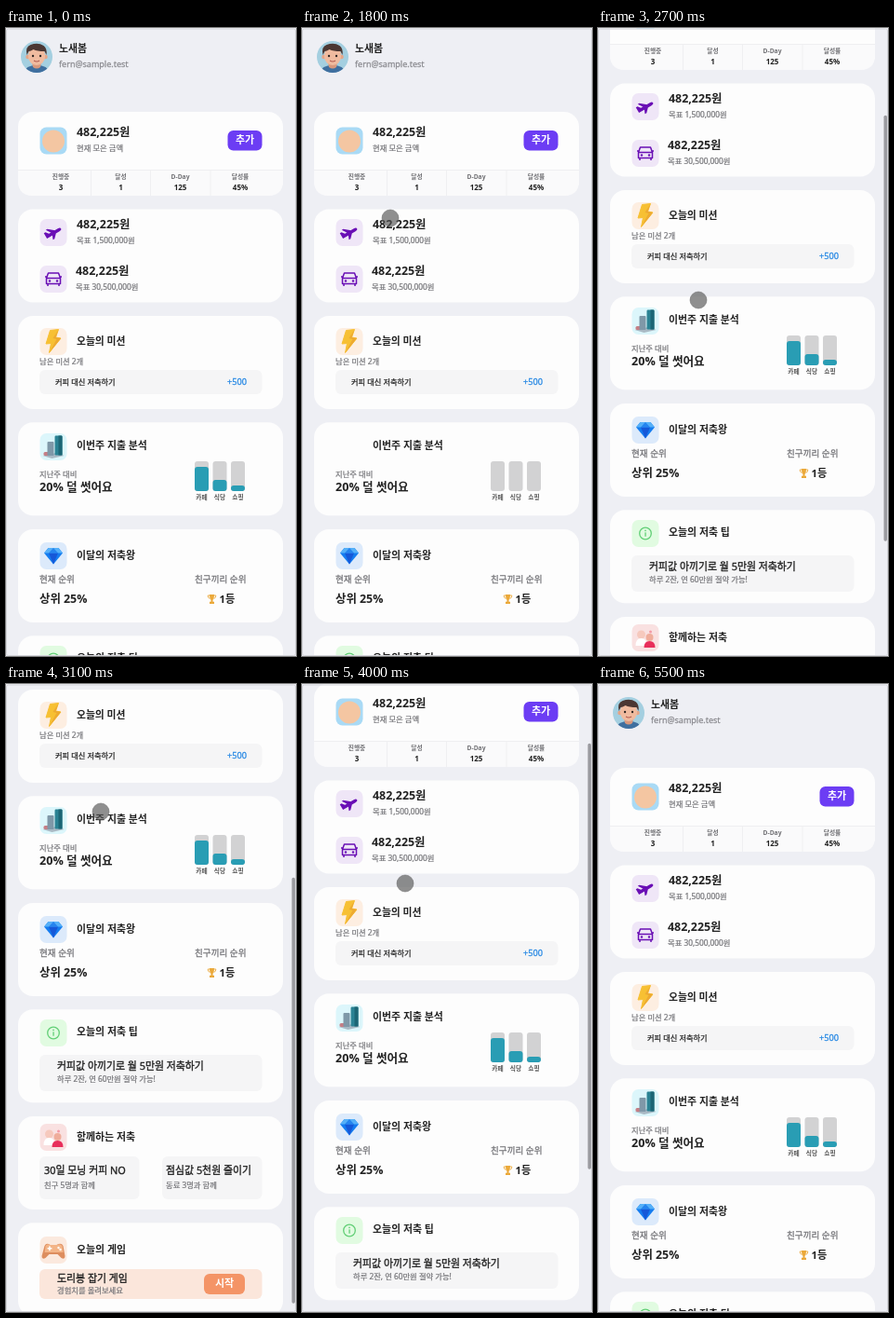
An HTML page for the animation above (5.6 s loop, 312 px wide and 674 px high).

```html
<!DOCTYPE html>
<html lang="ko">
<meta charset="utf-8">
<style>
html, body { margin: 0; height: 100%; overflow: hidden; background: #eeeff4 }
svg { display: block; width: 312px; height: 674px; font-family: 'Noto Sans', 'Noto Sans CJK KR', 'Noto Sans CJK', sans-serif }
</style>
<svg id="stage" viewBox="0 0 312 674"></svg>
<script>
const LOOP = 5600, STEP = 100;
const INK = '#222', GREY = '#77777b';

const rect = (x, y, w, h, r, fill, extra = '') =>
  `<rect x="${x}" y="${y}" width="${w}" height="${h}" rx="${r}" fill="${fill}" ${extra}/>`;
const circle = (x, y, r, fill) => `<circle cx="${x}" cy="${y}" r="${r}" fill="${fill}"/>`;
const path = (d, fill, extra = '') => `<path d="${d}" fill="${fill}" ${extra}/>`;
// y is the middle of the line; regular text gets a thin stroke for a medium weight
const text = (x, y, size, str, fill = INK, weight = 400, anchor = 'start') =>
  `<text x="${x}" y="${y + size * .36}" font-size="${size}" fill="${fill}" font-weight="${weight}" text-anchor="${anchor}"
    stroke="${fill}" stroke-width="${weight < 600 ? size * .03 : 0}">${str}</text>`;
const bold = (x, y, size, str, fill = INK, anchor) => text(x, y, size, str, fill, 600, anchor);
const note = (x, y, str) => text(x, y, 8.3, str, GREY);
const card = (y, h = 100) => rect(13, y, 285, h, 16, '#fdfdfd');
const panel = (x, y, w, h, fill = '#f5f5f6') => rect(x, y, w, h, 6, fill);
const icon = (y, fill, art, id = '') =>
  `<g id="${id}" transform="translate(36.5 ${y})">${rect(0, 0, 29, 29, 7, fill)}${art}</g>`;

const avatar = `<clipPath id="face"><circle cx="33" cy="31" r="17"/></clipPath><g clip-path="url(#face)">
  ${rect(16, 14, 34, 34, 0, '#a4cfe0')}
  ${path('M19 49q1-9 14-9t14 9z', '#3f6f9f')}${path('M28 37h10l-1 5q-4 3-8 0z', '#d9987c')}
  ${circle(23.5, 31, 2.3, '#e5a587')}${circle(42.5, 31, 2.3, '#e5a587')}
  ${rect(24, 20, 18, 20, 9, '#f0bb9f')}
  ${path('M22.500 29q-2-9 4-11 8-3 14 1 4 3 3 10l-2-4q-8 0-12-2-3 2-5 2z', '#4b3733')}
  ${circle(29, 30, 1.2, '#332925')}${circle(37, 30, 1.2, '#332925')}
  ${path('M30 35q3 2 6 0', 'none', 'stroke="#b55b50" stroke-width="1.2"')}</g>`;

// Both marks are drawn along a level body, the plane is then tilted
const plane = `<g transform="translate(14.500 15) rotate(-30)" fill="#6a0fb5">
  <path d="M-9-5l2 0 2.500 3.200h11q3 0 3 1.800t-3 1.800h-15.500zM-2-1.500L-5.500-7h2L3-1.500zM-2 1h5l-5 5h-2z"/></g>`;
const car = `<g fill="none" stroke="#6a0fb5" stroke-width="1.500" stroke-linejoin="round">
  <path d="M7 13.500l2-5.500h11l2 5.500v6H7zM7 13.500h15M5.500 12h2m14 0h2M8.500 19.500v2.500m12-2.500v2.500"/></g>
  ${circle(10.500, 16.500, 1.2, '#6a0fb5')}${circle(18.500, 16.500, 1.2, '#6a0fb5')}`;
const bolt = path('M11 2.500L20 1.500l-3 8.500 5.500 1L10 26.500l2-10-5.500.5z', '#f7c033', 'stroke="#f7c033" stroke-linejoin="round"') +
  path('M20 1.500l-3 8.500 5.500 1L10 26.500 18 12l-4-1z', '#eda932');
const chart = path('M3 24l15-3 8 3-13 3z', '#a9b9c4') + rect(4, 20, 9, 4, 1.500, '#c57f86') +
  rect(8, 9, 7, 15, 1, '#7f98a8') + rect(16, 2.500, 8, 21, 1.200, '#2b8394') + path('M20 2.500h3q1 0 1 1v20h-4z', '#1c6675');
const gem = path('M4.500 11.500l4.500-5.500h11l4.500 5.500-10 12z', '#147cf0') + path('M4.500 11.500l4.500-5.500h11l4.500 5.500z', '#55b0f8') +
  path('M9.500 11.500h10l-5 12z', '#1658d8') + path('M9.500 11.500l5-5.500 5 5.500z', '#2584ef');
const info = `<circle cx="14.500" cy="14.500" r="6.300" fill="none" stroke="#62cf76" stroke-width="1.300"/>` +
  rect(13.900, 13.300, 1.300, 4.500, .5, '#62cf76') + circle(14.500, 11.400, .8, '#62cf76');
const people = circle(10, 11, 4.500, '#f6c9bd') + path('M4 23q0-8 6-8t6 8z', '#fff') +
  circle(19, 14, 4, '#efad9b') + path('M13 25q0-7 6-7t6 7z', '#e82f5b') + circle(20, 8, 1.500, '#f49aa5');
const pad = path('M5 10q2-4 6-1h7q5-3 7 1l2 11q0 4-4 2l-4-4h-9l-4 4q-4 2-4-2z', '#dd8d5e') +
  path('M6 10q2-3 5-1h7q4-2 6 1l1 7H5z', '#f3b487') + rect(8, 12, 5, 1.500, .5, '#fff') +
  rect(9.700, 10.300, 1.500, 5, .5, '#fff') + circle(20, 12, 1.200, '#fff') + circle(22, 14, 1.200, '#fff');
const trophy = path('M219 608h5q0 5-1.500 5.800v2h1.500v2.200h-5v-2.200h1.500v-2q-1.500-.8-1.500-5.800z', '#eba93a') +
  path('M219 609h-1.800q0 3 2 3.300m4.800-3.300h1.800q0 3-2 3.300', 'none', 'stroke="#eba93a" stroke-width=".9"');

const stats = [['진행중', '3'], ['달성', '1'], ['D-Day', '125'], ['달성률', '45%']].map(([label, value], i) => {
  const x = [59, 123.500, 187.500, 252][i];
  return bold(x, 160, 6.700, label, '#707074', 'middle') + bold(x, 171, 8, value, INK, 'middle') +
    (i ? rect(x - 32.500, 153, 1, 27, 0, '#efeff1') : '');
}).join('');

const levels = [26, 12, 6];
const bars = ['카페', '식당', '쇼핑'].map((label, i) => {
  const x = 203 + i * 19.500;
  return rect(x, 465, 15, 32, 3, '#d2d2d3') + rect(x, 497, 15, 0, 3, '#299db4', 'class="bar"') +
    bold(x + 7.500, 504, 6.700, label, '#555', 'middle');
}).join('');

const page = [
  avatar, bold(57, 22, 10.900, '노새봄'), text(57, 39, 9, 'fern@sample.test', '#8c8c91'),

  card(90, 90), path('M13 153h285v11q0 16-16 16H29q-16 0-16-16z', '#fafafb'), rect(13, 152, 285, 1, 0, '#efeff1'),
  icon(106.500, '#a9daf5', circle(14.500, 15, 12, '#f4c6a2')),
  bold(76, 112, 12.400, '482,225원'), note(76, 129, '현재 모은 금액'),
  rect(238.500, 110, 37, 21.500, 6, '#6c3df4'), bold(257, 120.500, 11, '추가', '#fff', 'middle'), stats,

  card(194.500), icon(205, '#efe6f7', plane), bold(76, 211, 12.400, '482,225원'), note(76, 228, '목표 1,500,000원'),
  icon(255, '#efe6f7', car), bold(75, 261, 12.400, '482,225원'), note(75, 278, '목표 30,500,000원'),

  card(309), icon(322, '#fdeee1', bolt), bold(76, 336, 10.800, '오늘의 미션'), note(36, 358, '남은 미션 2개'),
  panel(36, 367, 239.500, 26), text(53, 380, 8.200, '커피 대신 저축하기'),
  text(259, 380, 9.200, '+500', '#2688e4', 400, 'end'),

  card(423.300), icon(435, '#dcf6fb', chart, 'chart'), bold(76, 448, 10.900, '이번주 지출 분석'),
  note(36, 479, '지난주 대비'), bold(36, 492, 12.600, '20% 덜 썻어요'), bars,

  card(538), icon(552, '#dceafb', gem), bold(76, 566, 10.900, '이달의 저축왕'),
  text(36, 592, 9.600, '현재 순위', GREY), bold(36, 613, 12.400, '상위 25%'),
  text(203, 592, 9.600, '친구끼리 순위', GREY), trophy, bold(229.500, 613, 11.200, '1등'),

  card(652.300), icon(663, '#e1fbe1', info), bold(76, 676, 10.900, '오늘의 저축 팁'), panel(36, 701, 239.500, 39),
  text(55, 713, 10.900, '커피값 아끼기로 월 5만원 저축하기'), note(55, 727, '하루 2잔, 연 60만원 절약 가능!'),

  card(767), icon(775, '#f9e1e1', people), bold(76, 789, 10.900, '함께하는 저축'),
  panel(36, 810, 107.500, 46), text(41, 825, 10.900, '30일 모닝 커피 NO'), note(41, 841, '친구 5명과 함께'),
  panel(168, 810, 107.500, 46), text(172, 825, 10.900, '점심값 5천원 줄이기'), note(172, 841, '동료 3명과 함께'),

  card(881.300), icon(896, '#fbe9de', pad), bold(76, 910, 10.900, '오늘의 게임'), panel(36, 931, 239.500, 32, '#fbe6db'),
  text(55, 941, 10.900, '도리봉 잡기 게임'), note(55, 954, '경험치를 올려보세요'),
  rect(213, 936, 44, 22, 6, '#f49466'), bold(235, 946.500, 11, '시작', '#fff', 'middle')
].join('');

const $ = id => document.getElementById(id);
$('stage').innerHTML = rect(0, 0, 312, 674, 0, '#eeeff4') + `<g id="page">${page}</g>` +
  rect(307.500, 2, 3.500, 457, 1.700, '#9b9ba0', 'id="thumb"') +
  '<circle id="touch" r="9" fill="#555" fill-opacity=".65" stroke="#666" stroke-opacity=".5"/>' +
  rect(.5, 1, 311, 672.500, 2, 'none', 'stroke="#d5d6db"');
const barNodes = document.querySelectorAll('.bar');

// Each key is [time, ...values]
const scrollKeys = [[2400, 0], [2500, 25], [2600, 78], [2700, 135], [2800, 190], [2900, 240], [3000, 280], [3100, 303],
  [3200, 314], [3300, 318], [3700, 318], [3800, 290], [3900, 190], [4000, 91], [4100, 35], [4200, 8], [4300, -2], [4400, -1], [4600, 0]];
const touchKeys = [[1400, 82, 190], [1800, 95, 204], [2000, 102, 270], [2300, 108, 420], [2400, 108, 427], [2500, 108, 402],
  [2700, 108, 292], [2900, 105, 187], [3100, 102, 137], [3600, 102, 137], [3800, 106, 150], [4000, 111, 214], [4200, 111, 245]];
const thumbKeys = [[2300, 0], [2400, 1], [3300, 1], [3500, .65], [3700, .5], [3800, 1], [4500, 1], [4900, 0]];
const growKeys = [[1500, 1], [1600, 0], [1900, 0], [2400, 1]];

function at(keys, t) {
  const i = keys.findIndex(k => k[0] > t);
  if (i < 1) return keys.at(i).slice(1);
  const a = keys[i - 1], b = keys[i], p = (t - a[0]) / (b[0] - a[0]);
  return a.slice(1).map((v, n) => v + (b[n + 1] - v) * p);
}

function draw(now) {
  const t = Math.floor(now % LOOP / STEP) * STEP;
  const [scroll] = at(scrollKeys, t), [grow] = at(growKeys, t), [x, y] = at(touchKeys, t);
  $('page').setAttribute('transform', `translate(0 ${-scroll})`);
  $('chart').setAttribute('opacity', grow);
  barNodes.forEach((bar, i) => {
    bar.setAttribute('y', 497 - levels[i] * grow);
    bar.setAttribute('height', levels[i] * grow);
  });
  $('thumb').setAttribute('y', Math.max(2, Math.min(212, 2 + scroll * .679)));
  $('thumb').setAttribute('opacity', at(thumbKeys, t)[0]);
  $('touch').setAttribute('transform', `translate(${x} ${y})`);
  $('touch').setAttribute('opacity', t >= 1400 && t < 5000 ? 1 : 0);
  requestAnimationFrame(draw);
}
requestAnimationFrame(() => draw(performance.now()));
</script>
</html>
```
